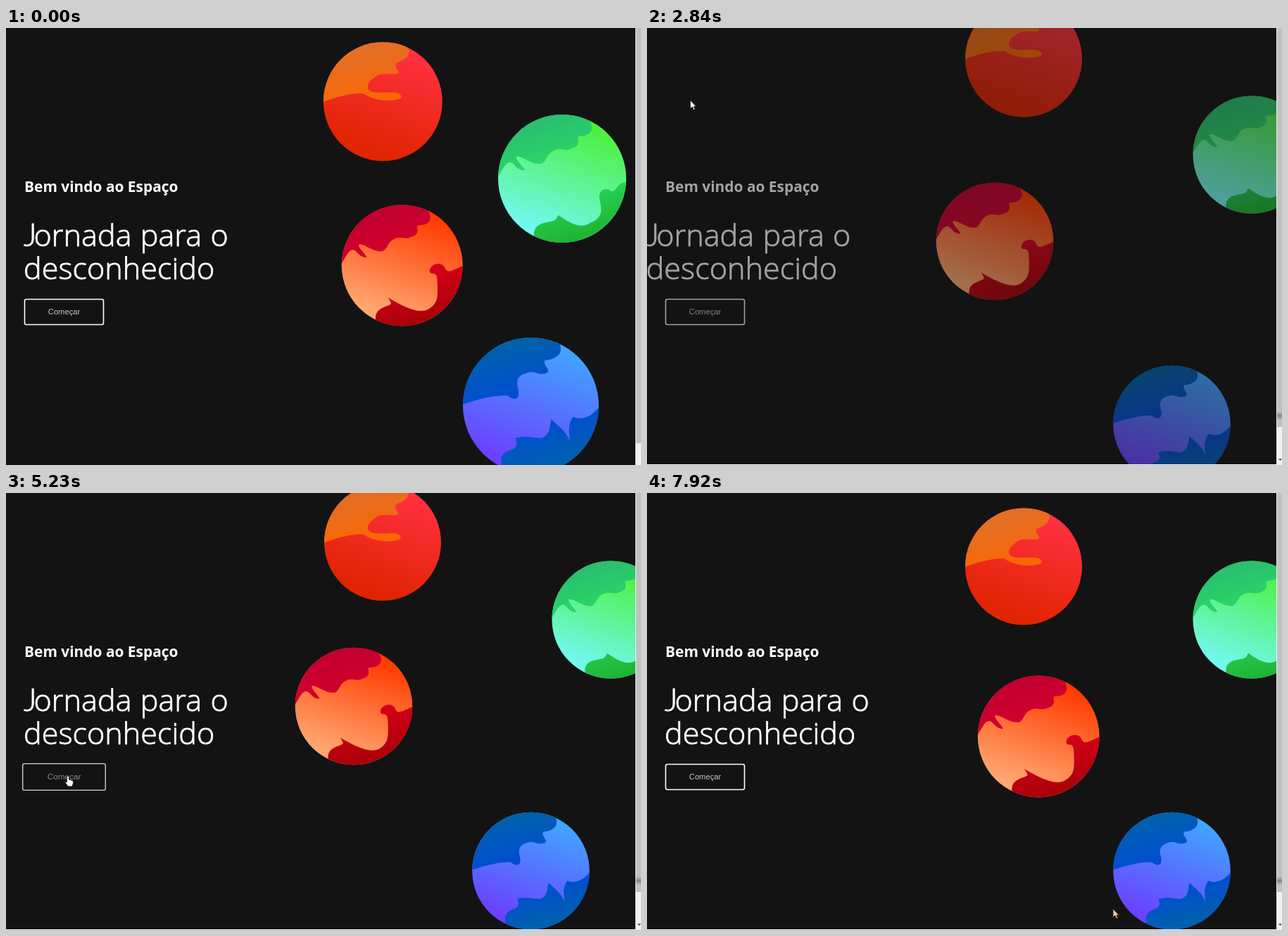
An HTML page with a canvas that plays this animation: 902x621 px, repeating every 8 s.

```html
<!DOCTYPE html>
<html lang="pt">
<head>
<meta charset="utf-8">
<style>
html, body { margin: 0; width: 100%; height: 100%; overflow: hidden; background: #131313; }
canvas { display: block; }
</style>
</head>
<body>
<canvas id="stage" width="902" height="621"></canvas>
<script>
const ctx = document.getElementById('stage').getContext('2d');
const LOOP = 8000, RELOAD = 2070, ENTER = 2300, SETTLED = 3240;

// Eased interpolation through keys of the form [time, ...values]
function at(keys, t) {
  const next = keys.findIndex(k => k[0] > t);
  if (next === 0) return keys[0].slice(1);
  if (next < 0) return keys[keys.length - 1].slice(1);
  const a = keys[next - 1], b = keys[next];
  const u = (t - a[0]) / (b[0] - a[0]), e = u * u * (3 - 2 * u);
  return a.slice(1).map((v, i) => v + (b[i + 1] - v) * e);
}

// Surface shapes, drawn around the planet's centre
const coast = new Path2D('M-88 1C-80-12-76-22-70-22C-64-22-62-11-50-11C-54-19-64-26-61-30C-54-31-40-18-28-20C-20-23-22-33-10-38C-2-42 4-36 12-40C22-43 23-47 21-55C21-59 34-54 39-64C42-70 38-74 37-78V-100H-100V1Z');
const bay = new Path2D('M88 0C72 6 64 14 60 2C54-6 40-2 39 8C41 17 50 4 50 24C51 46 50 52 42 59C28 72 6 61-20 46C-14 56-14 55-22 58C-34 62-40 68-37 80V100H100V0Z');
const cove = new Path2D('M88 5C72 4 74 18 66 17C60 12 52 14 50 22C49 32 56 40 50 50C46 56 42 58 38 59C26 69 8 59-5 49C-9 58-12 57-22 59C-34 61-40 68-37 80V100H100V5Z');
const tongue = new Path2D('M-86 1C-66-6-42-13-27-11C-16-3 8 2 24-4C30-8 22-14 10-13C-4-12-12-13-15-14C-25-17-22-27-13-33C-2-43 8-38 20-39C26-43 17-46 18-52C20-57 30-56 36-66C38-70 37-73 35-78V-100H-100V1Z');
const ridge = new Path2D('M-98-1C-66-12-46-15-33-14C-20-4-15-12-18-24C-22-38-16-43-6-46C6-50 8-43 20-45C32-49 16-56 20-64C30-64 42-70 42-78C43-82 41-85 41-90V-110H-110V-1Z');
const fjord = new Path2D('M98 0C88 14 74 22 60 16C52 26 54 36 55 50C49 36 40 30 29 20C26 30 28 42 15 46C4 46-6 42-22 46C-18 56-20 60-32 64C-44 70-42 76-41 88V110H110V0Z');

const planets = [
  { unit: 84, base: ['#ff3040', '#e02400'], land: [[tongue, '#e07029', '#ff6600', -84, 0]],
    rest: [535.3, 104.5, 84.5],
    keys: [[ENTER, 535, 2, 83], [SETTLED, 535, 70, 83], [5400, 535, 70, 83], [6050, 377.3, 198.2, 75], [6980, 535, 104.5, 83]] },
  { unit: 86, base: ['#4df03c', '#72f8f0'],
    land: [[coast, '#2abd70', '#2ae062', -86, 0], [cove, '#2ae062', '#20b234', 0, 86]],
    rest: [790, 214, 91], keys: [[ENTER, 859, 180, 83.5]] },
  { unit: 86, base: ['#ff3a00', '#ffa872'],
    land: [[coast, '#c00030', '#dc002b', -86, 0], [bay, '#e0001e', '#a80008', 0, 86]],
    rest: [562.7, 337.3, 86],
    keys: [[6930, 494, 303, 83.3], [7300, 330, 428, 75], [8000, 564.5, 343, 86.8]] },
  { unit: 96, base: ['#40a4ff', '#6c40ff'],
    land: [[ridge, '#0062a8', '#0047e0', -96, 0], [fjord, '#0047e0', '#0062a8', 10, 96]],
    rest: [745.5, 536.5, 96.5], keys: [[ENTER, 745.5, 604, 83.3], [SETTLED, 745.5, 537, 83.3]] }
];

function gradient(x0, y0, x1, y1, from, to) {
  const g = ctx.createLinearGradient(x0, y0, x1, y1);
  g.addColorStop(0, from);
  g.addColorStop(1, to);
  return g;
}

function drawPlanet({ unit, base, land }, [x, y, r]) {
  ctx.save();
  ctx.translate(x, y);
  ctx.scale(r / unit, r / unit);
  ctx.beginPath();
  ctx.arc(0, 0, unit, 0, 7);
  ctx.fillStyle = gradient(unit * .35, -unit * .85, -unit * .25, unit * .85, ...base);
  ctx.fill();
  ctx.clip();
  for (const [shape, from, to, y0, y1] of land) {
    ctx.fillStyle = gradient(-12, y0, 12, y1, from, to);
    ctx.fill(shape);
  }
  ctx.restore();
}

function text(str, x, y, font, color = '#fff') {
  ctx.font = font;
  ctx.fillStyle = color;
  ctx.fillText(str, x, y);
}

const buttonKeys = [ // time, scale, teal fill, dimming
  [2900, 1, 0, 0], [3200, 1.05, 0, 1], [4200, 1.05, 0, 1], [4400, .98, 1, 1], [4750, .98, 1, 1],
  [5000, 1.05, 0, 1], [5750, 1.05, 0, 1], [5980, 1.01, 0, 0], [6400, 1, 0, 0]
];

function drawButton(t) {
  const [scale, teal, dim] = at(buttonKeys, t);
  const light = 255 - 45 * dim, label = 200 - 60 * dim;
  ctx.save();
  ctx.translate(82.5, 403.5);
  ctx.scale(scale, scale);
  ctx.beginPath();
  ctx.roundRect(-56, -18, 112, 36, 2.5);
  ctx.fillStyle = `rgba(85,193,181,${teal})`;
  ctx.fill();
  ctx.strokeStyle = `rgb(${light},${light},${light})`;
  ctx.lineWidth = 1.6 - .3 * dim;
  ctx.stroke();
  ctx.textAlign = 'center';
  text('Começar', 0, 3.7, '11.2px "Liberation Sans", Arial, sans-serif',
    teal > .5 ? '#3f827b' : `rgb(${label},${label},${label})`);
  ctx.restore();
}

// The title is a light face, slightly thickened
function titleText(str, x, y, font) {
  text(str, x, y, font);
  ctx.strokeStyle = '#fff';
  ctx.lineWidth = .8;
  ctx.lineJoin = 'round';
  ctx.strokeText(str, x, y);
}

function drawCopy(shift) {
  const light = '300 43.2px "Open Sans", sans-serif';
  text('Bem vindo ao Espaço', 26, 233, 'bold 20.9px "Open Sans", sans-serif');
  ctx.save();
  ctx.wordSpacing = '1px';
  titleText('J', 25 + shift, 309.5, '300 45px Lato, sans-serif');
  titleText('ornada para o', 39.5 + shift, 309.5, light);
  titleText('desconhecido', 25 + shift, 357, light);
  ctx.restore();
}

const arrow = new Path2D('M0 0V12L3 9.5L5 14L7 13L5 9H8.5Z');
const hand = new Path2D('M-1.5 1Q0-1 1.5 1V5L7 7Q8 8 7.5 11L6 15H0L-4 9Q-4 7-1.5 9Z');
const pointerOut = [[70, 848, 604], [580, 11, -8]];
const pointerBack = [
  [2650, 40, -20], [3200, 117, 421], [3900, 108, 413], [4400, 104, 410], [4800, 104, 410],
  [5500, 80, 398], [5900, 73, 394], [6250, 73, 394], [6840, 472, 306], [7000, 472, 306], [7920, 662, 591]
];

function drawPointer(t) {
  if (t < 70 || (t > 580 && t < 2650)) return;
  const [x, y] = at(t < RELOAD ? pointerOut : pointerBack, t);
  const onButton = t > 3100 && t < 6350;
  ctx.save();
  ctx.translate(x, y);
  if ((t > 5880 && t < 6100) || (t > 6840 && t < 7010)) {
    ctx.beginPath();
    ctx.arc(-.5, -.5, 8, 0, 7);
    ctx.fillStyle = onButton ? 'rgba(255,240,0,.55)' : '#ffb51c';
    ctx.fill();
  }
  const shape = onButton ? hand : arrow;
  ctx.lineWidth = 1;
  ctx.strokeStyle = '#222';
  ctx.fillStyle = t > 7100 ? '#ffc8a4' : '#fff';
  ctx.fill(shape);
  ctx.stroke(shape);
  ctx.restore();
}

function rect(color, x, y, w, h) {
  ctx.fillStyle = color;
  ctx.fillRect(x, y, w, h);
}

function drawBrowser(t) {
  const loaded = t >= RELOAD;
  if (loaded) rect('#fff', 0, 620, 902, 1);
  if (t >= 1660 && t < 2450) rect('#f2f2f2', 0, 618, 295, 3);
  rect('#f1f1f1', 894, 0, 8, 621);
  rect('#c1c1c1', 895, 0, 7, !loaded ? 590 : t < 2450 ? 545 : 567);
  if (!loaded) return;
  if (t >= 2450) {
    rect('#a8a8a8', 895, 546, 7, 10);
    rect('#8c8c8c', 895, 549, 7, 4);
  }
  ctx.fillStyle = '#505050';
  ctx.fill(new Path2D('M897 612H902L899.5 615Z'));
}

function draw(t) {
  const loaded = t >= RELOAD;
  const [veil, shift] = loaded ? at([[ENTER, 1, -68], [SETTLED, 0, 0]], t) : [0, 0];
  rect('#131313', 0, 0, 902, 621);
  for (const p of planets) drawPlanet(p, loaded ? at(p.keys, t) : p.rest);
  drawCopy(shift);
  drawButton(t);
  rect(`rgba(19,19,19,${veil})`, 0, 0, 902, 621);
  drawBrowser(t);
  drawPointer(t);
}

function tick() {
  draw(performance.now() % LOOP);
  requestAnimationFrame(tick);
}
tick();
</script>
</body>
</html>
```
